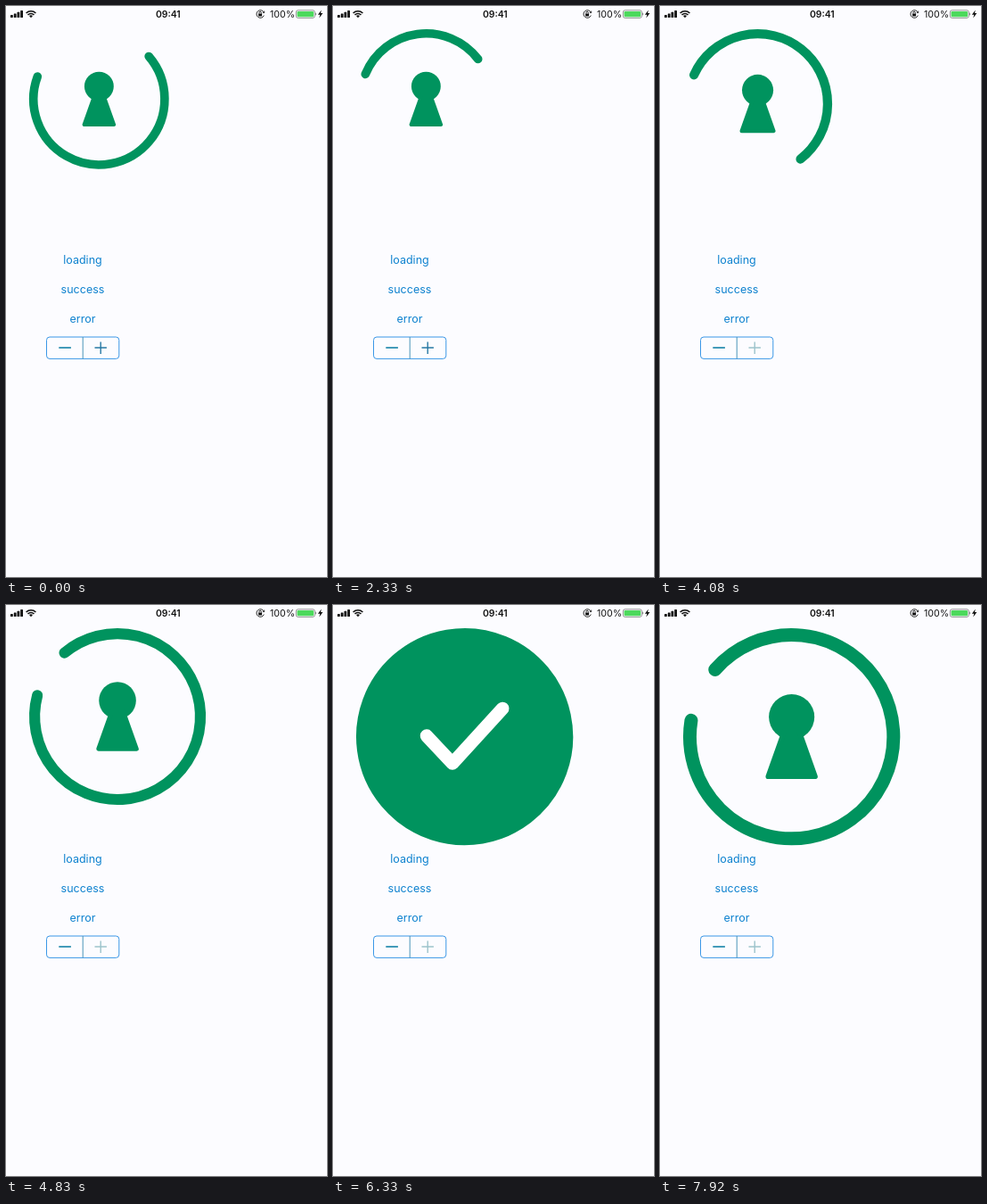
Write an HTML page that moves like this. It is 360x640 px and loops after 8000 ms.

```html
<!DOCTYPE html>
<html lang="en">
<head>
<meta charset="utf-8">
<title>Lock loading indicator</title>
<style>
  html, body { margin: 0; width: 100%; height: 100%; overflow: hidden; background: #fcfcff; }
  svg { display: block; width: 360px; height: 640px; }
  text { font-family: Inter, "Open Sans", sans-serif; }
  .button { font-size: 12.5px; fill: #0e82cf; text-anchor: middle; }
  .line { fill: none; stroke-linecap: round; stroke-linejoin: round; }
</style>
</head>
<body>
<svg viewBox="0 0 360 640">
  <!-- status bar -->
  <g fill="#111">
    <rect x="5" y="10" width="2.8" height="3" rx=".6"/>
    <rect x="8.8" y="8.5" width="2.8" height="4.5" rx=".6"/>
    <rect x="12.5" y="6.8" width="2.8" height="6.2" rx=".6"/>
    <rect x="16.2" y="5" width="2.8" height="8" rx=".6"/>
    <path d="M28 13.2 26 11.1a2.9 2.9 0 0 1 4 0Z"/>
    <text x="181.8" y="12.8" font-size="10.4" font-weight="600" text-anchor="middle">09:41</text>
    <text x="296" y="12.9" font-size="10.6">100%</text>
    <path d="M353.8 4.4 349.8 9.8h2.4l-.9 3.8 4-5.5h-2.4Z"/>
    <rect x="283.1" y="8.4" width="4" height="3.1" rx=".4"/>
  </g>
  <g fill="none" stroke="#111">
    <path d="M22.6 8a7.7 7.7 0 0 1 10.8 0M24.5 10a5 5 0 0 1 7 0" stroke-width="1.6"/>
    <path d="M289.3 7.4a4.3 4.3 0 1 0 0 3.2M283.9 8.5v-1a1.2 1.2 0 0 1 2.4 0v1" stroke-width=".9"/>
    <path d="M287.8 7.6h1.9v-2" stroke-width=".8"/>
    <rect x="325.3" y="4.8" width="21" height="8.6" rx="2.2" stroke="#777" stroke-width=".8"/>
  </g>
  <rect x="326.5" y="6" width="18.6" height="6.2" rx="1.2" fill="#4cd95c"/>
  <path d="M347.2 7.6a1.7 1.7 0 0 1 0 3Z" fill="#777"/>

  <!-- lock, drawn in a unit square -->
  <g id="lock" fill="#00935e" stroke="#00935e">
    <circle cx=".5" cy=".409" r=".105" stroke="none"/>
    <path d="M.468 .47H.532L.608 .683H.392Z" stroke-width=".024" stroke-linejoin="round"/>
    <path id="ring" class="line"/>
    <path id="check" class="line" d="M.325 .496 .444 .623 .675 .37" pathLength="1" stroke="#fff" stroke-width=".06"/>
  </g>

  <!-- controls -->
  <text class="button" x="86" y="289">loading</text>
  <text class="button" x="86" y="322">success</text>
  <text class="button" x="86" y="355">error</text>
  <g fill="none" stroke="#3b97e6">
    <rect x="45.5" y="371" width="81.3" height="24.4" rx="3.5"/>
    <path d="M86.2 371v24.4" stroke="#4a94b8"/>
    <path d="M59.3 383h13.6" stroke="#1583a8" stroke-width="1.6"/>
    <path id="plus" d="M99.5 383h13.4M106.2 376.5v13.4" stroke-width="1.4"/>
  </g>
</svg>
<script>
  const LOOP = 8000;
  const BASE_ANGLE = 200.3;
  const STROKE = 0.0615;
  const SIZE = { small: 156.7, large: 243.3, from: 3345, to: 6395 };
  const SUCCESS = { close: 4950, fill: 5050, filled: 5515, checked: 5950, end: 7050 };
  // [time, spinner turns]
  const TURNS = [[0, .842], [1080, 1.445], [2330, 2.083], [4080, 3.161],
                 [4950, 3.66], [7050, 4], [7920, 4.512], [8000, 4.555]];

  const $ = id => document.getElementById(id);
  const mix = (a, b, k) => a + (b - a) * k;
  const progress = (t, from, to) => Math.min(1, Math.max(0, (t - from) / (to - from)));

  function bezier(x1, y1, x2, y2) {
    const at = (a, b, u) => 3 * (1 - u) ** 2 * u * a + 3 * (1 - u) * u * u * b + u ** 3;
    return x => {
      let low = 0, high = 1;
      for (let i = 0; i < 24; i++) {
        const mid = (low + high) / 2;
        if (at(x1, x2, mid) < x) low = mid; else high = mid;
      }
      return at(y1, y2, low);
    };
  }
  const easeInQuint = bezier(.755, .05, .855, .06);
  const easeOutQuint = bezier(.23, 1, .32, 1);
  const easeInOut = bezier(.42, 0, .58, 1);

  function turnsAt(t) {
    const i = TURNS.findIndex(([time]) => time > t);
    const [t0, a] = TURNS[i - 1], [t1, b] = TURNS[i];
    return mix(a, b, progress(t, t0, t1));
  }

  function drawRing(start, end, hole) {
    const r = (.5 + hole) / 2;
    const sweep = Math.min(.9999, Math.max(.0005, end - start));
    const point = fraction => {
      const angle = (BASE_ANGLE + fraction * 360) * Math.PI / 180;
      return `${.5 + r * Math.cos(angle)} ${.5 + r * Math.sin(angle)}`;
    };
    $("ring").setAttribute("d",
      `M${point(start)}A${r} ${r} 0 ${+(sweep > .5)} 1 ${point(start + sweep)}`);
    $("ring").setAttribute("stroke-width", .5 - hole);
  }

  function draw(t) {
    const size = mix(SIZE.small, SIZE.large, easeInOut(progress(t, SIZE.from, SIZE.to)));
    $("lock").setAttribute("transform", `translate(26 26) scale(${size})`);
    $("plus").setAttribute("stroke", t < SIZE.from ? "#2678a4" : "#9cc3cb");

    const success = t >= SUCCESS.close && t < SUCCESS.end;
    const phase = turnsAt(success ? SUCCESS.close : t) % 1;
    const closing = success ? progress(t, SUCCESS.close, SUCCESS.fill) : 0;
    const filling = success ? progress(t, SUCCESS.fill, SUCCESS.filled) : 0;
    drawRing(mix(easeInQuint(phase), 0, closing),
             mix(easeOutQuint(phase), 1, closing),
             (.5 - STROKE) * (1 - filling));

    const checked = success ? easeInOut(progress(t, SUCCESS.filled, SUCCESS.checked)) : 0;
    $("check").setAttribute("visibility", checked > 0 ? "visible" : "hidden");
    $("check").setAttribute("stroke-dasharray", `${checked} 2`);
  }

  function tick() {
    draw(performance.now() % LOOP);
    requestAnimationFrame(tick);
  }
  tick();
</script>
</body>
</html>
```
